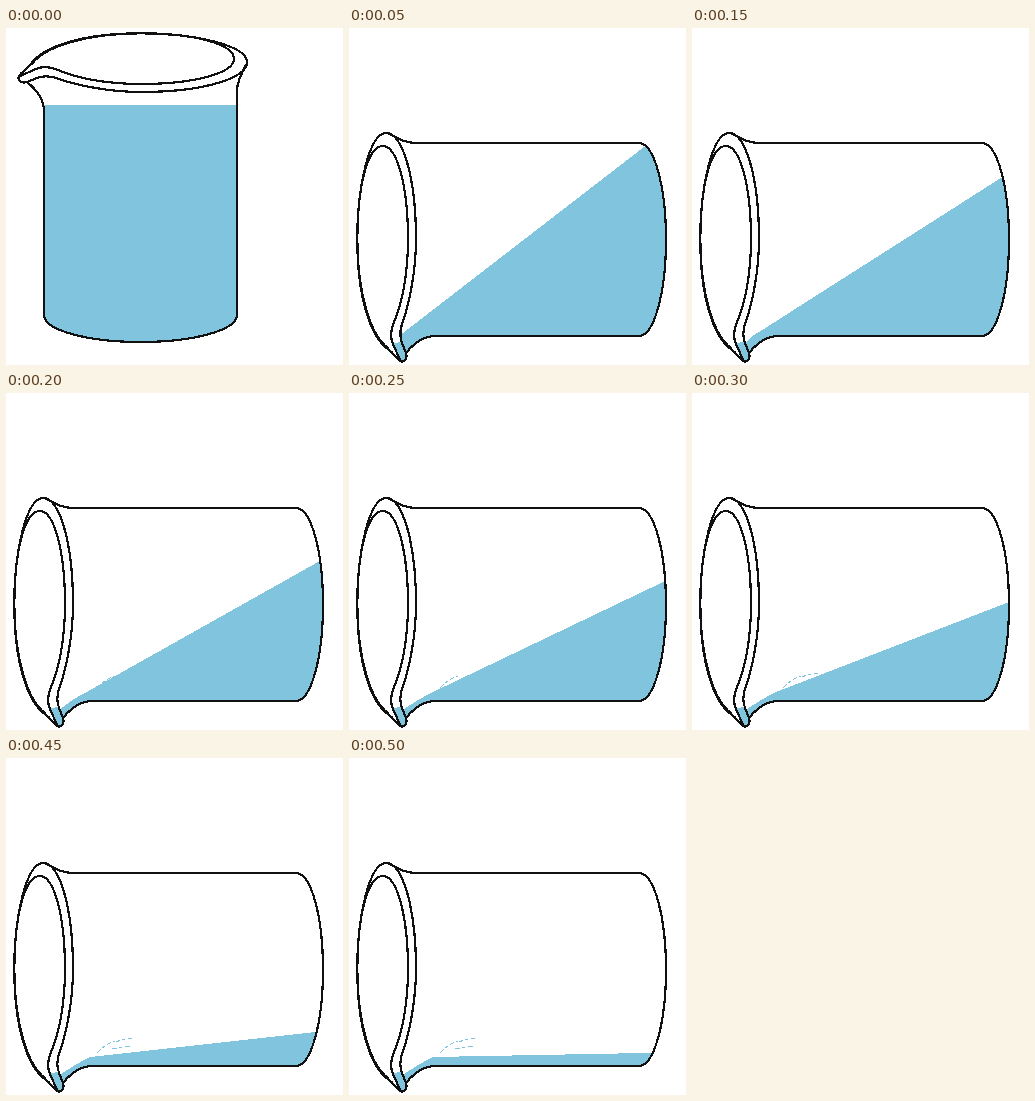
An HTML page that plays this animation: 337 by 337 pixels, repeating every 650 ms.

```html
<!DOCTYPE html>
<html lang="en">
<head>
<meta charset="utf-8">
<title>Pouring beaker</title>
<style>
html, body { margin: 0; width: 100%; height: 100%; overflow: hidden; background: #fff; }
svg { display: block; width: 100vw; height: 100vh; shape-rendering: crispEdges; }
.line { fill: none; stroke: #111; stroke-width: 2.2; stroke-linejoin: round; stroke-linecap: round; }
.water { fill: #80c4dd; }
.drop { fill: none; stroke: #80c4dd; stroke-dasharray: 5 2 3 3; }
</style>
</head>
<body>
<svg viewBox="0 0 337 337">
  <defs>
    <clipPath id="inside">
      <path class="tilt" d="M21 54C31 62 38 71 38 84V287C38 302 81 314 134.5 314S231 302 231 287V64C231 54 235 47 240 37C232 55 180 64 135 64C105 64 72 58 50 50C38 46 31 50 21 54Z"/>
    </clipPath>
  </defs>
  <g clip-path="url(#inside)">
    <path class="water" id="level"/>
  </g>
  <g class="tilt">
    <path class="water" id="spout" d="M31 41L32 50L21 54Q13 55 14 48L24 43Z"/>
    <g class="line">
      <path d="M21 54C31 62 38 71 38 84V287C38 302 81 314 134.5 314S231 302 231 287V64C231 54 235 47 240 37"/>
      <path d="M14 47C16 43 20 43 24 37C36 19 75 5.3 135 5.3C190 5.3 241 18 241 34C241 51 195 64 135 64C105 64 72 58 50 50C38 46 31 50 21 54C15 56 10 51 14 47Z"/>
      <path d="M14 48C23 45 28 40 38 39C44 39 47 40 52 42C70 50 100 56 135 56C188 56 228 45 228 31C228 15 185 5.3 135 5.3C80 5.3 38 19 26 36"/>
    </g>
  </g>
  <path class="drop" d="M91 295Q98 287 109 283"/>
  <path class="drop" d="M110 284Q117 281 126 280"/>
  <path class="drop" d="M106 291Q114 290 125 288"/>
</svg>
<script>
const STEP = 50, LOOP = 650, LAST = 10;
const level = document.getElementById("level");
const spout = document.getElementById("spout");
const tilted = document.querySelectorAll(".tilt");
const drops = document.querySelectorAll(".drop");

const show = (el, on) => el.setAttribute("opacity", on ? 1 : 0);

// The far end sinks steadily while the bend near the lip moves inward.
function surface(step) {
  if (!step) return "M0 77H337V337H0Z";
  const right = 102 + 21.4 * (step - 1);
  const x = Math.min(84, 42 + 9 * step);
  const y = 320 - x / 4;
  return `M317 ${right}L${x} ${y}Q${x - 11} ${y + 5} 52 318V337H317Z`;
}

function draw() {
  const time = performance.now() % LOOP;
  const step = Math.min(LAST, Math.floor(time / STEP));
  const turn = step ? "matrix(0 -1 1 0 3 346)" : "";
  tilted.forEach(el => el.setAttribute("transform", turn));
  level.setAttribute("d", surface(step));
  show(spout, step > 0);
  drops.forEach((el, i) => show(el, step >= 4 + 1.5 * i));
  requestAnimationFrame(draw);
}
draw();
</script>
</body>
</html>
```
